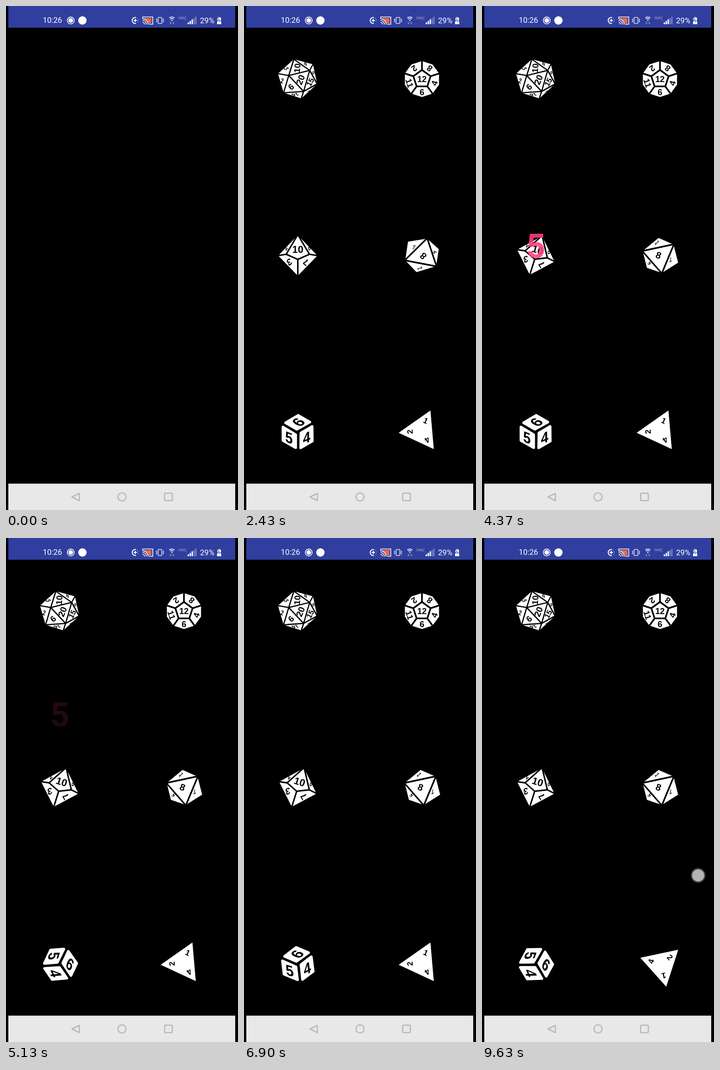
An HTML page that plays this animation: 498x1080 px, repeating every 9660 ms.

```html
<!DOCTYPE html>
<html lang="en">
<head>
<meta charset="utf-8">
<title>Dice</title>
<style>
  html, body { margin: 0; width: 498px; height: 1080px; overflow: hidden; background: #000; }
  svg { display: block; }
  text { font-family: "Liberation Sans", Arial, sans-serif; font-weight: bold; text-anchor: middle; }
  .bar text { font-family: Roboto, sans-serif; font-weight: 400; text-anchor: start; fill: #fff; font-size: 16.6px; }
  .roll { font-family: Roboto, sans-serif; font-size: 72px; font-weight: 700; fill: #ff4081; }
</style>
</head>
<body>
<svg id="stage" width="498" height="1080" viewBox="0 0 498 1080">
  <defs>
    <radialGradient id="glow">
      <stop offset=".68" stop-color="#b4b4b4"/>
      <stop offset=".76" stop-color="#6c6c6c"/>
      <stop offset="1" stop-color="#222" stop-opacity="0"/>
    </radialGradient>
  </defs>
  <rect width="498" height="1080"/>

  <g class="bar" fill="none" stroke="#fff" stroke-width="1.6">
    <rect x="5" width="487" height="46.5" fill="#303f9f" stroke="none"/>
    <g stroke="none">
      <text x="79" y="36">10:26</text>
      <text x="416.5" y="37">29%</text>
      <circle cx="139" cy="31" r="5" fill="#fff"/>
      <circle cx="164" cy="31" r="9" fill="#fff"/>
    </g>
    <circle cx="139" cy="31" r="7.4"/>
    <path d="M279 37.3A6.5 6.5 0 1 1 279 24.7M274 31h7M277.5 27.5v7" stroke-width="2"/>
    <path d="M281 25.5a6.5 6.5 0 0 1 1 10" stroke="#9a97cc" stroke-dasharray="2 2"/>
    <!-- cast -->
    <path d="M296 26h16v11h-7q-2-6-9-8z" fill="#ef6b3e" stroke="none"/>
    <path d="M293.5 28v-4.5h21.5v15.5h-8M293 31a8.5 8.5 0 0 1 8.5 8.5M293 27.5a12 12 0 0 1 12 12M293 35a4.5 4.5 0 0 1 4.5 4.5"/>
    <!-- vibrate -->
    <rect x="326.5" y="24.5" width="8" height="13" rx="1" stroke="#dcdcec"/>
    <path d="M324 27l-1.5 2 1.5 2-1.5 2 1.5 2M337 27l1.5 2-1.5 2 1.5 2-1.5 2" stroke-width="1.2"/>
    <!-- wifi -->
    <path d="M350.5 25.5q5.500-4 11 0M352.5 28.2q3.500-2.600 7 0"/>
    <path d="M354 30h4l-2 2.5z" fill="#fff" stroke="none"/>
    <path d="M353 34v5M359 34v5" stroke="#7f82c4" stroke-width="2.5"/>
    <path d="M371 23v4h5M375 23l13 7M378 24h10M378 27h7M372 23l6 5" stroke="#7a76b8" stroke-width="1.3"/>
    <!-- signal -->
    <g stroke-width="2.8">
      <path d="M391.4 39v-4M395.6 39v-7M399.8 39v-10.5"/>
      <path d="M403.8 39v-13M407.6 39v-16" stroke="#757fc2"/>
    </g>
    <!-- battery -->
    <path d="M455 23h5v2h2v6h-9v-6h2z" fill="#7d84c0" stroke="none"/>
    <path d="M454 28l3-3h4v8l1 1v5h-9v-5l2-2z" fill="#fff" stroke="none"/>
    <path d="M458 27l-2.5 4h4l-2.5 4" stroke="#303f9f" stroke-width="1.2"/>
  </g>

  <g fill="none" stroke="#b9b9b9" stroke-width="2.6" stroke-linejoin="round">
    <rect x="5" y="1023.5" width="487" height="57" fill="#e8e8e8" stroke="none"/>
    <path d="M157.5 1044.5v15.5L141.5 1052z"/>
    <circle cx="249" cy="1052" r="8.7"/>
    <rect x="340.5" y="1044" width="16.5" height="16" rx="2"/>
  </g>

  <g id="dice"></g>
  <g id="rolls"></g>
  <circle id="touch" cx="464" cy="723" r="17.5" fill="url(#glow)"/>
</svg>

<script>
const LOOP = 9660, APPEAR = 300, SETTLE = 1490, SPIN = 650, RISE = 1000, HEIGHT = 180;
const FACE = '#fff';
const dice = document.getElementById('dice');
const rolls = document.getElementById('rolls');
const touch = document.getElementById('touch');

function add(parent, tag, attrs, text) {
  const el = document.createElementNS('http://www.w3.org/2000/svg', tag);
  for (const k in attrs) el.setAttribute(k, attrs[k]);
  if (text) el.textContent = text;
  parent.appendChild(el);
  return el;
}

function label(g, s, x, y, rot, size, squash = '') {
  add(g, 'text', {
    transform: `translate(${x} ${y}) rotate(${rot}) ${squash}`,
    y: size * 0.36, 'font-size': size
  }, s);
}

// White silhouette with black edges drawn over it.
function body(g, outline, edges, width = 3) {
  add(g, 'path', { d: `M${outline}z`, fill: FACE });
  add(g, 'path', { d: edges, fill: 'none', stroke: '#000', 'stroke-width': width, 'stroke-linejoin': 'round' });
}

const polar = (r, deg) => {
  const a = deg * Math.PI / 180;
  return [+(r * Math.cos(a)).toFixed(2), +(r * Math.sin(a)).toFixed(2)];
};

const draw = {
  d20(g) {
    body(g, '-8-42L33-31 42 11 8 42-30 30-42-11',
      'M-19-7L26-18 13 27zM-8-42L-19-7-30 30 13 27 42 11 26-18zM-42-11L-19-7M33-31L26-18M8 42L13 27', 2.6);
    label(g, '20', 6, 2, -68, 19);
    label(g, '10', -1, -23, -86, 18);
    label(g, '6', -14, 17, -42, 18);
    label(g, '15', 27, 7, -62, 16);
    label(g, '2', -33, 4, 15, 15, 'scale(.75 1)');
    label(g, '3', -24, -22, 40, 15, 'skewX(-25) scale(.8)');
    label(g, '16', -5, 34, 172, 13, 'skewX(30) scale(1 .65)');
    label(g, '8', 17, -32, 25, 13, 'skewX(25) scale(1 .6)');
    label(g, '5', 34, -13, 70, 13, 'scale(1 .55)');
    label(g, '7', 24, 28, -35, 12, 'scale(1 .5)');
  },
  d12(g) {
    const rim = [], core = [];
    let spokes = '';
    for (let i = 0; i < 10; i++) rim.push(polar(38.5, -90 + 36 * i));
    for (let i = 0; i < 5; i++) {
      core.push(polar(19.5, -90 + 72 * i));
      spokes += `M${core[i]}L${polar(39, -90 + 72 * i)}`;
    }
    body(g, rim.join('L'), `M${core.join('L')}z${spokes}`, 3.6);
    label(g, '12', 0, 0.5, 0, 18);
    ['6', '11', '2', '8', '4'].forEach((s, i) => {
      const [x, y] = polar(28, 90 + 72 * i);
      label(g, s, x, y, 72 * i, 18);
    });
  },
  d10(g) {
    body(g, '0-44L42 0 0 43-42 0',
      'M0-45L-25-3 0 8 25-3zM-43 0L-25-3M43 0L25-3M0 8V44', 3.2);
    label(g, '10', 0, -13.5, 0, 21.5);
    label(g, '3', -18, 14, 140, 19, 'skewX(-15)');
    label(g, '7', 17, 14, -140, 19, 'skewX(15)');
    label(g, '2', -26, -17, -60, 18, 'skewX(-20) scale(.8 .7)');
    label(g, '8', 26, -17, 60, 18, 'skewX(20) scale(.8 .7)');
  },
  d8(g) {
    const c = add(g, 'g', { transform: 'translate(1 .5)' });
    body(c, '-38-10L-4-38 28-24 38 15 3 37-29 26', 'M-39-10L29-24.5 3 38z', 3.4);
    label(c, '8', -4, -1, 20, 20);
    label(c, '1', -7, -28, 75, 13, 'skewX(25) scale(.8 1)');
    label(c, '5', -23, 16, 205, 14, 'skewX(-25) scale(.8)');
    label(c, '7', 22, 9, 150, 14, 'skewX(-25) scale(.8)');
  },
  d6(g) {
    for (const turn of [0, 120, 240]) {
      add(g, 'path', {
        transform: `rotate(${turn})`, d: 'M-4.5 5V33L-32 17.5V-11.5z', fill: FACE,
        stroke: FACE, 'stroke-width': 5.5, 'stroke-linejoin': 'round'
      });
    }
    label(g, '5', -19, 11, 0, 33, 'matrix(.87 .35 0 1 0 0)');
    label(g, '4', 19, 11, 0, 33, 'matrix(.87 -.35 0 1 0 0)');
    label(g, '6', 1, -22, -60, 33, 'matrix(.87 .35 0 1 0 0)');
  },
  d4(g) {
    const at = [[-90, '4'], [30, '2'], [150, '1']];
    const c = add(g, 'g', { transform: 'translate(0 3.7)' });
    add(c, 'path', { d: `M${at.map(a => polar(48, a[0])).join('L')}z`, fill: FACE });
    for (const [a, s] of at) label(c, s, ...polar(24, a), a + 90, 17);
  }
};

// Each spin is [start, end angle].
const set = [
  { type: 'd20', x: 115, y: 156, from: 0 },
  { type: 'd12', x: 382, y: 156.5, from: 0, sway: 6 },
  { type: 'd10', x: 115.5, y: 535, from: 0, sway: -6, spins: [[3609, 377.5]] },
  { type: 'd8', x: 382, y: 534.5, from: -146, spins: [[2373, -720]] },
  { type: 'd6', x: 115.5, y: 913.5, from: 0, sway: -6, spins: [[4776, -480], [6426, 89]] },
  { type: 'd4', x: 382, y: 913.3, from: 145, spins: [[7916, 648]] }
];
for (const d of set) {
  d.el = add(dice, 'g');
  draw[d.type](d.el);
}

const scores = [
  { s: '8', x: 382, y: 535, t: 3023 },
  { s: '5', x: 115.5, y: 535, t: 4259 },
  { s: '5', x: 115.5, y: 913.5, t: 5426 },
  { s: '3', x: 115.5, y: 913.5, t: 7076 },
  { s: '2', x: 382, y: 913.5, t: 8566 }
];
for (const n of scores) {
  n.el = add(rolls, 'text', { class: 'roll', x: n.x }, n.s);
}

const clamp = v => Math.min(1, Math.max(0, v));
const ease = p => (1 - Math.cos(Math.PI * p)) / 2;

function pose(d, t) {
  let angle = d.from, dx = 0;
  if (d.sway) {
    const p = clamp((t - APPEAR) / (SETTLE - APPEAR));
    angle = -360 * (1 - ease(p));
    dx = d.sway * Math.sin(Math.PI * p);
  }
  let last = d.from;
  for (const [start, end] of d.spins || []) {
    if (t < start) break;
    angle = last + (end - last) * ease(clamp((t - start) / SPIN));
    last = end;
  }
  return `translate(${d.x + dx} ${d.y}) rotate(${angle})`;
}

function render(t) {
  dice.style.display = t < APPEAR ? 'none' : '';
  for (const d of set) d.el.setAttribute('transform', pose(d, t));
  for (const n of scores) {
    const p = (t - n.t) / RISE;
    n.el.setAttribute('opacity', p >= 0 && p < 1 ? 1 - p : 0);
    n.el.setAttribute('y', n.y - HEIGHT * p + 25.5);
  }
  touch.style.display = t < 9500 ? 'none' : '';
}

const begin = performance.now();
function tick() {
  render((performance.now() - begin) % LOOP);
  requestAnimationFrame(tick);
}
tick();
</script>
</body>
</html>
```
